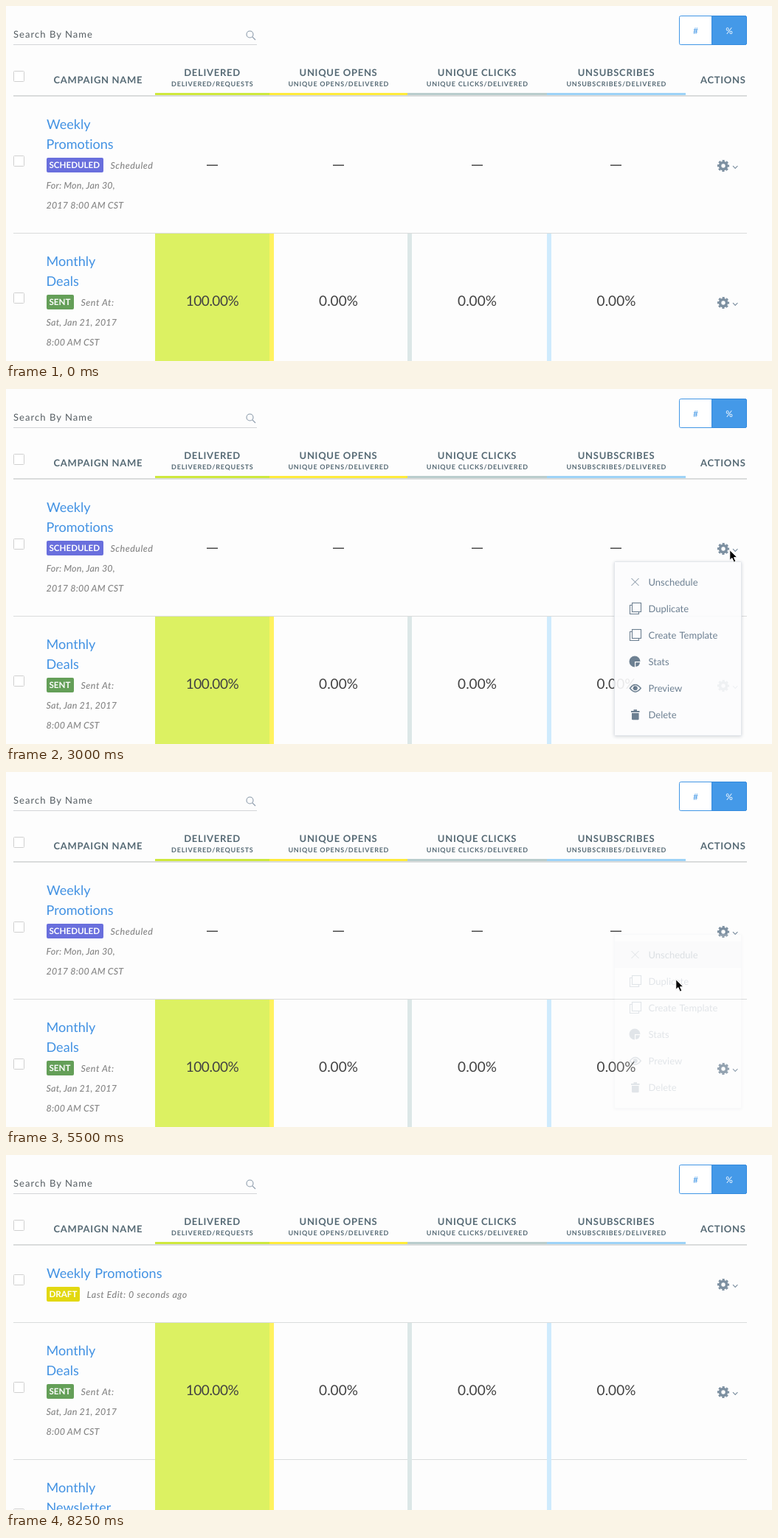
An HTML page for the animation above (9 s loop, 1038 px wide and 482 px high).

```html
<!DOCTYPE html>
<html lang="en">
<head>
<meta charset="utf-8">
<title>Campaign list</title>
<style>
html, body { margin: 0; width: 100%; height: 100%; overflow: hidden; background: #fdfdfd; }
svg { display: block; width: 1038px; height: 482px; }
text {
  font-family: Lato, "Open Sans", sans-serif;
  font-variant-ligatures: none;
  text-rendering: geometricPrecision;
}

.search { font-size: 13px; letter-spacing: 1.05px; fill: #555d62; }
.head { font-size: 13px; font-weight: 700; letter-spacing: .7px; fill: #566a75; }
.sub { font-size: 9px; font-weight: 700; letter-spacing: .75px; fill: #566a75; }
.mid { text-anchor: middle; }
.link { font-size: 18px; letter-spacing: .05px; word-spacing: 1.5px; fill: #4292e3; }
.badge { font-size: 11.6px; font-weight: 700; fill: #fff; }
.meta { font-size: 12.5px; font-style: italic; font-weight: 500; letter-spacing: .5px; fill: #858585; }
.date { letter-spacing: .18px; }
.value { font-size: 19px; text-anchor: middle; fill: #424242; }
.full { letter-spacing: -.5px; }
.toggle { font-size: 12px; text-anchor: middle; }
.menu text { font-size: 13px; word-spacing: 1.2px; fill: currentColor; }
.rule { fill: #dadcdc; }
.dash { fill: #4a4a4a; }

/* every change is a hard step */
.menu, .hot, .un, .dup, .list, .before, .after, .cursor {
  animation: 9s step-end infinite;
}
.menu { color: #5d7286; visibility: hidden; animation-name: menu; }
.hot { animation-name: hot; }
.un { animation-name: un; }
.dup { animation-name: dup; }
.list { animation-name: list; }
.before { animation-name: before; }
.after { animation-name: after; }
.cursor { animation-name: cursor; }

@keyframes menu {
  0% { visibility: hidden; opacity: 0; transform: translateY(-20px); }
  30.555% { visibility: visible; opacity: .4; transform: translateY(-12px); }
  33.333% { visibility: visible; opacity: .9; transform: translateY(-2px); }
  36.111% { visibility: visible; opacity: 1; transform: none; }
  58.333% { visibility: visible; opacity: .7; transform: translateY(-6px); }
  61.111% { visibility: visible; opacity: .17; transform: translateY(-16px); }
  63.888%, 100% { visibility: hidden; opacity: 0; transform: translateY(-20px); }
}
@keyframes hot {
  0% { opacity: 0; transform: none; }
  44.444% { opacity: 1; transform: translateY(36px); }
  47.222%, 100% { opacity: 1; transform: none; }
}
@keyframes un {
  0% { color: #5d7286; }
  47.222% { color: #4d6277; }
  50%, 100% { color: #3b5168; }
}
@keyframes dup {
  0% { color: #5d7286; }
  44.444% { color: #3b5168; }
  47.222% { color: #4d6277; }
  50%, 100% { color: #5d7286; }
}
@keyframes list {
  0% { transform: none; }
  63.888%, 100% { transform: translateY(-81px); }
}
@keyframes before {
  0% { visibility: visible; }
  63.888%, 100% { visibility: hidden; }
}
@keyframes after {
  0% { visibility: hidden; }
  63.888%, 100% { visibility: visible; }
}
@keyframes cursor {
  0% { opacity: 0; transform: translate(890px, 276px); }
  8.333% { opacity: 1; transform: translate(890px, 276px); }
  11.111% { opacity: 1; transform: translate(861px, 272px); }
  16.666% { opacity: 1; transform: translate(876px, 272px); }
  19.444% { opacity: 1; transform: translate(952px, 271px); }
  22.222% { opacity: 1; transform: translate(982px, 239px); }
  25% { opacity: 1; transform: translate(980px, 218px); }
  41.666% { opacity: 1; transform: translate(972px, 260px); }
  44.444% { opacity: 1; transform: translate(930px, 288px); }
  47.222% { opacity: 1; transform: translate(907px, 281px); }
  75% { opacity: 1; transform: translate(901px, 279px); }
  77.777% { opacity: 1; transform: translate(481px, 271px); }
  80.555% { opacity: 1; transform: translate(277px, 228px); }
  83.333% { opacity: 1; transform: translate(257px, 228px); }
  88.888% { opacity: 1; transform: translate(990px, 125px); }
  91.666%, 100% { opacity: 0; transform: translate(990px, 125px); }
}
</style>
</head>
<body>
<svg viewBox="0 0 1038 482">
  <defs>
    <rect id="box" x="10.5" y="-7" width="14" height="14" rx="1" fill="#fff" stroke="#d0d0d0"/>
    <g id="gear" fill="none" stroke="#7d90a1">
      <circle cx="972" r="4.5" stroke-width="3.6"/>
      <circle cx="972" r="6.6" stroke-width="3" stroke-dasharray="2.9 2.284" stroke-dashoffset="1.45"/>
      <path d="M985 .2 l3.2 3.2 3.2 -3.2" stroke-width="1.2"/>
    </g>
    <g id="copy" fill="none" stroke="currentColor" stroke-width="1.1">
      <rect x="848.5" y="-7.5" width="12" height="12"/>
      <path d="M848 -4.5 H845.5 V7.5 H857.5 V5"/>
    </g>
  </defs>

  <rect width="1038" height="482" fill="#fdfdfd"/>

  <!-- search and unit toggle -->
  <text class="search" x="10" y="43">Search By Name</text>
  <path d="M10 52.5 H340" stroke="#d3d5d8"/>
  <g fill="none" stroke="#8a9aaa" stroke-width="1.1">
    <circle cx="330.5" cy="38.5" r="4.5"/>
    <path d="M333.8 41.8 L338 46"/>
  </g>
  <rect x="912.5" y="13.5" width="91" height="39" rx="2" fill="#fff" stroke="#4297e6"/>
  <path d="M956.5 13.5 H1001.5 Q1003.5 13.5 1003.5 15.5 V50.5 Q1003.5 52.5 1001.5 52.5 H956.5 Z" fill="#4499e8" stroke="#348ade"/>
  <text class="toggle" x="934.5" y="38" fill="#4297e6">#</text>
  <text class="toggle" x="980" y="38" fill="#fff">%</text>

  <!-- column heads -->
  <use href="#box" y="95.5"/>
  <text class="head" x="64.5" y="105">CAMPAIGN NAME</text>
  <g class="mid">
    <text class="head" x="279.5" y="95">DELIVERED</text>
    <text class="sub" x="279.8" y="109">DELIVERED/REQUESTS</text>
    <text class="head" x="450.5" y="95">UNIQUE OPENS</text>
    <text class="sub" x="450.8" y="109">UNIQUE OPENS/DELIVERED</text>
    <text class="head" x="638.5" y="95">UNIQUE CLICKS</text>
    <text class="sub" x="638.8" y="109">UNIQUE CLICKS/DELIVERED</text>
    <text class="head" x="827" y="95">UNSUBSCRIBES</text>
    <text class="sub" x="827.3" y="109">UNSUBSCRIBES/DELIVERED</text>
  </g>
  <text class="head" x="941" y="105">ACTIONS</text>
  <rect class="rule" x="10" y="121" width="994" height="2"/>
  <rect x="202" y="118" width="155" height="3" fill="#cfe83c"/>
  <rect x="357" y="118" width="187" height="3" fill="#ffeb3b"/>
  <rect x="544" y="118" width="189" height="3" fill="#b9cdcd"/>
  <rect x="733" y="118" width="188" height="3" fill="#9dd3f7"/>

  <!-- first row, scheduled -->
  <g class="before">
    <use href="#box" y="210.5"/>
    <text class="link" x="55" y="167">Weekly</text>
    <text class="link" x="54.5" y="194">Promotions</text>
    <rect x="55" y="206" width="77" height="20" rx="2" fill="#696fdd"/>
    <text class="badge" x="58.5" y="219.5">SCHEDULED</text>
    <text class="meta" x="141.5" y="221">Scheduled</text>
    <text class="meta date" x="54.5" y="248">For: Mon, Jan 30,</text>
    <text class="meta date" x="54.5" y="275">2017 8:00 AM CST</text>
    <path class="dash" d="M272 215.5 h15 v1.5 h-15z M443 215.5 h15 v1.5 h-15z M631 215.5 h15 v1.5 h-15z M819 215.5 h15 v1.5 h-15z"/>
    <use href="#gear" y="217"/>
  </g>

  <!-- first row, draft -->
  <g class="after">
    <use href="#box" y="169.5"/>
    <text class="link" x="55" y="167">Weekly Promotions</text>
    <rect x="55" y="179" width="45" height="20" rx="2" fill="#e2d810"/>
    <text class="badge" x="58.5" y="192.5">DRAFT</text>
    <text class="meta" x="109.5" y="194">Last Edit: 0 seconds ago</text>
    <use href="#gear" y="176"/>
  </g>

  <!-- sent rows -->
  <g class="list">
    <rect class="rule" x="10" y="308" width="994" height="1"/>
    <rect class="rule" x="10" y="494" width="994" height="1"/>
    <rect x="202" y="309" width="155" height="260" fill="#dcf162"/>
    <rect x="357" y="309" width="6" height="260" fill="#fff25f"/>
    <rect x="544" y="309" width="6" height="260" fill="#dce7e7"/>
    <rect x="733" y="309" width="6" height="260" fill="#cfebfd"/>
    <use href="#box" y="396.5"/>
    <text class="link" x="54.5" y="353">Monthly</text>
    <text class="link" x="54.5" y="380">Deals</text>
    <rect x="55" y="392" width="37" height="20" rx="2" fill="#649f58"/>
    <text class="badge" x="58.5" y="405.5">SENT</text>
    <text class="meta" x="101.5" y="407">Sent At:</text>
    <text class="meta date" x="54.5" y="434">Sat, Jan 21, 2017</text>
    <text class="meta date" x="54.5" y="461">8:00 AM CST</text>
    <text class="value full" x="279.5" y="407">100.00%</text>
    <text class="value" x="450.5" y="407">0.00%</text>
    <text class="value" x="638.5" y="407">0.00%</text>
    <text class="value" x="827" y="407">0.00%</text>
    <use href="#gear" y="403"/>
    <use href="#box" y="568.5"/>
    <text class="link" x="54.5" y="539">Monthly</text>
    <text class="link" x="54.5" y="566">Newsletter</text>
  </g>

  <!-- actions menu -->
  <g class="menu">
    <rect x="824.5" y="236.5" width="172" height="236" rx="1" fill="#fcfcfd" stroke="#e0e4e9"
      style="filter: drop-shadow(0 1px 2px rgba(60, 75, 95, .25))"/>
    <rect class="hot" x="825" y="246" width="171" height="36" fill="#e9ecef"/>
    <g class="un">
      <path d="M847.5 259 l10 10 m0 -10 l-10 10" fill="none" stroke="currentColor" stroke-width=".9"/>
      <text x="870.5" y="269">Unschedule</text>
    </g>
    <g class="dup">
      <use href="#copy" y="300"/>
      <text x="870.5" y="305">Duplicate</text>
    </g>
    <use href="#copy" y="336"/>
    <text x="870.5" y="341">Create Template</text>
    <g fill="currentColor">
      <path d="M852 372 H859.5 A7.5 7.5 0 1 0 852 379.5 Z"/>
      <path d="M853.2 373.2 H859 A5.8 5.8 0 0 1 853.2 379 Z"/>
    </g>
    <text x="870.5" y="377">Stats</text>
    <path d="M845.5 408.3 Q852.8 398.6 860.2 408.3 Q852.8 418 845.5 408.3 Z" fill="none" stroke="currentColor" stroke-width="1.5"/>
    <circle cx="852.8" cy="408.2" r="3" fill="currentColor"/>
    <text x="870.5" y="413">Preview</text>
    <path d="M847 439 h3.5 v-1.8 h4.5 v1.8 h3.5 v2 h-11.5 z M848 442 h9.6 v8 q0 1.2 -1.2 1.2 h-7.2 q-1.2 0 -1.2 -1.2 z" fill="currentColor"/>
    <text x="870.5" y="449">Delete</text>
  </g>

  <path class="cursor" d="M.8 .6 V14.4 L3.9 11.6 L6.4 17.2 L8.9 16.1 L6.5 10.7 H10.9 Z"
    fill="#000" stroke="#fff" stroke-width="1" stroke-linejoin="round"/>
</svg>
</body>
</html>
```
